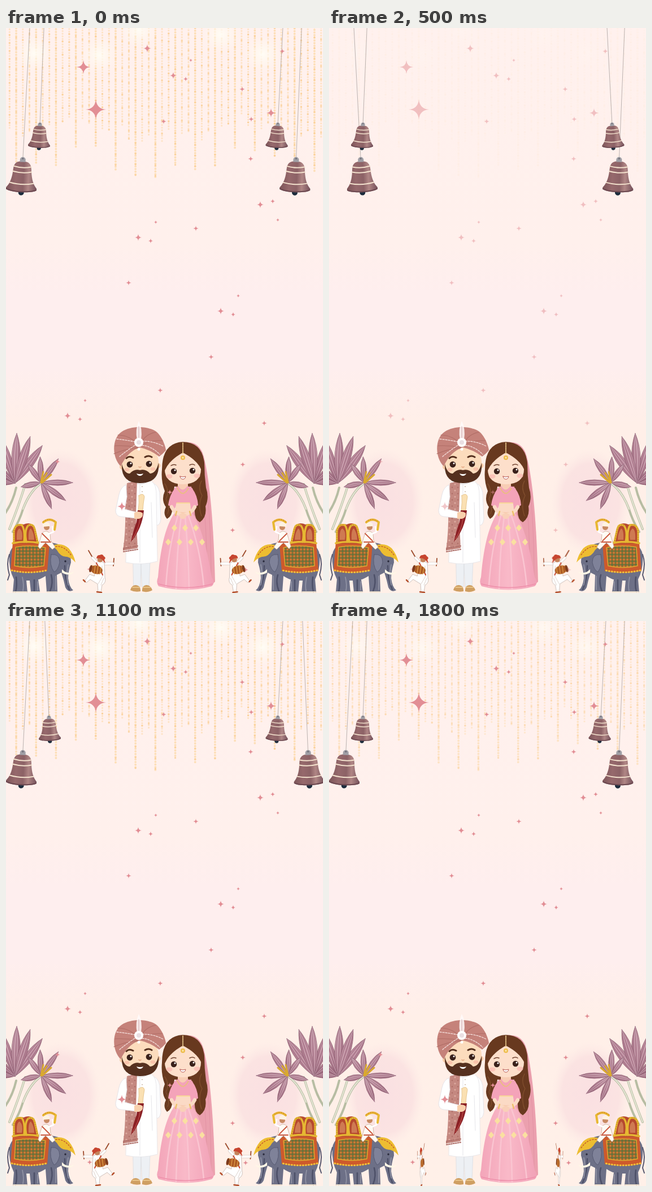
Write an HTML page that moves like this. It is 561 px wide and 998 px high and loops after 1900 ms.

```html
<!DOCTYPE html>
<html lang="en">
<head>
<meta charset="utf-8">
<title>Wedding invitation</title>
<style>
html, body { margin: 0; width: 100%; height: 100%; overflow: hidden; background: #fff0ea; }
svg { display: block; width: 561px; height: 998px; }
</style>
</head>
<body>
<svg viewBox="0 0 561 998" fill="none" stroke-linecap="round" stroke-linejoin="round">
<defs>
  <linearGradient id="sky" x2="0" y2="1">
    <stop offset="0" stop-color="#fff1ee"/><stop offset=".38" stop-color="#fff0ec"/>
    <stop offset=".47" stop-color="#feeeee"/><stop offset=".6" stop-color="#feeeee"/>
    <stop offset=".7" stop-color="#ffefe8"/><stop offset="1" stop-color="#fff0e8"/>
  </linearGradient>
  <radialGradient id="glow"><stop stop-color="#fffdf5" stop-opacity=".95"/><stop offset=".5" stop-color="#fffaf0" stop-opacity=".5"/><stop offset="1" stop-color="#fff8ee" stop-opacity="0"/></radialGradient>
  <radialGradient id="wash"><stop stop-color="#fae0e2"/><stop offset=".72" stop-color="#fbe3e2"/><stop offset="1" stop-color="#fdeae6" stop-opacity="0"/></radialGradient>
  <linearGradient id="metal"><stop stop-color="#7d5559"/><stop offset=".3" stop-color="#96696c"/><stop offset=".55" stop-color="#8c6266"/><stop offset=".72" stop-color="#b08685"/><stop offset="1" stop-color="#74505a"/></linearGradient>
  <linearGradient id="skirt"><stop stop-color="#f3a5b9"/><stop offset=".5" stop-color="#f9b9c8"/><stop offset="1" stop-color="#f1a2b7"/></linearGradient>
  <linearGradient id="petal" x2="1" y2="1"><stop stop-color="#d0a9b5"/><stop offset=".5" stop-color="#b98799"/><stop offset="1" stop-color="#9b667b"/></linearGradient>
  <pattern id="dots" width="10" height="11" patternUnits="userSpaceOnUse"><circle cx="3" cy="3" r="1.6" fill="#dcaaa0"/><circle cx="8" cy="8.500" r="1.200" fill="#ad6d65"/></pattern>
  <pattern id="weave" width="6" height="6" patternUnits="userSpaceOnUse"><path d="M0 0h6v6h-6z" fill="#68753a"/><path d="M0 3L3 0L6 3L3 6Z" fill="#b9672f"/><circle cx="3" cy="3" r=".8" fill="#e6b843"/></pattern>
  <g id="bell">
    <circle cx="0" cy="63" r="5" fill="#1c2c3d"/>
    <path d="M-5 8C-12 9-15 13-16 21C-17 37-20 47-27 55V58C-20 64 20 64 27 58V55C20 47 17 37 16 21C15 13 12 9 5 8Z" fill="url(#metal)"/>
    <path d="M-27 56C-18 62 18 62 27 56V58C20 64-20 64-27 58Z" fill="#6b4850"/>
    <path d="M-15.500 17Q0 21 15.500 17M-16.500 26Q0 30 16.500 26M-21 46Q0 51 21 46" stroke="#f3e1cd" stroke-width="2"/>
    <path d="M-5 9V5Q-5 1 0 0Q5 1 5 5V9Z" fill="#a09fa6"/><circle cx="0" cy="3" r="1.500" fill="#6d6c75"/>
  </g>
  <g id="drummer">
    <path d="M146 923L153 935M191 937L190 950" stroke="#9c4a2b" stroke-width="1.800"/>
    <path d="M162 945L153 936M171 946L189 946" stroke="#cfc3bd" stroke-width="5"/>
    <path d="M162 945L153 936M171 946L189 946" stroke="#fff" stroke-width="3.800"/>
    <path d="M160 944Q167 940 174 945L175 970Q178 980 170 984L168 996H163L162 982L149 974L142 980L139 977L148 965L156 968Z" fill="#fff" stroke="#c9bcb6" stroke-width=".9"/>
    <path d="M170 950L171 968L163 982M173 972L168 984" stroke="#d8ccc6" stroke-width=".9"/>
    <path d="M161 996L169 997M140 978L137 975" stroke="#b5522f" stroke-width="2.500"/>
    <path d="M160 945L171 966" stroke="#c9482f" stroke-width="2"/>
    <ellipse cx="160" cy="957" rx="11" ry="7.500" transform="rotate(14 160 957)" fill="#ad5b24"/>
    <path d="M153 949L151 960M158 949L156 963M163 950L161 964M168 953L166 965" stroke="#e6a950" stroke-width="1.100"/>
    <ellipse cx="150" cy="955" rx="2.500" ry="6.500" transform="rotate(14 150 955)" fill="#7d3a1c"/>
    <circle cx="166.500" cy="939" r="4.800" fill="#c5825a"/>
    <path d="M160 937Q161 930 166 931Q171 928 173 933Q178 936 174 939L176 946L171 940Q166 935 160 937Z" fill="#c7452f"/>
  </g>
  <g id="side">
    <ellipse cx="98" cy="837" rx="70" ry="94" fill="url(#wash)"/>
    <path d="M34 806Q24 840 6 885M18 812Q12 838-2 858M62 804Q42 818 30 850Q24 870 12 890" stroke="#b7bda3" stroke-width="4"/>
    <path d="M34 806Q24 840 6 885M62 804Q42 818 30 850" stroke="#e8e9d8" stroke-width="2"/>
    <g id="petals"></g>
    <path d="M62 803L72 786M64 803L80 789M62 802L66 784" stroke="#d9a92f" stroke-width="3"/>
    <path d="M6 930Q10 906 46 908Q88 906 100 916Q115 924 115 944Q110 960 110 972Q112 988 119 993Q110 998 105 988Q102 974 98 962L90 966L91 996H72L70 968Q60 974 57 974L60 996H44L42 976H36L38 997H12L14 974Q4 954 6 930Z" fill="#6d7087"/>
    <path d="M18 970Q20 985 17 996M50 975V995M80 966Q84 980 78 995M104 950Q104 975 112 992" stroke="#4d5068" stroke-width="2.500"/>
    <path d="M29 970Q32 984 30 994M56 978V993M88 968V992M110 948Q106 970 110 984" stroke="#9597a8" stroke-width="1.500"/>
    <path d="M6 930Q0 946 6 966L3 975" stroke="#565970" stroke-width="2"/>
    <path d="M80 930Q95 928 95 944Q92 958 85 961Q76 948 80 930Z" fill="#7f8299" stroke="#585b73"/>
    <path d="M99 956Q108 966 121 960Q113 970 99 962Z" fill="#fff7e6"/>
    <path d="M82 914Q99 908 111 919Q120 930 123 944Q116 936 108 934Q97 935 90 922Z" fill="#edbd31"/>
    <path d="M88 916Q103 914 115 931" stroke="#c95b2b" stroke-width="1.500" stroke-dasharray="2 3"/>
    <circle cx="105" cy="942" r="1.700" fill="#28293a"/>
    <path d="M13 996H37M45 996H59M73 996H90" stroke="#e8dccb" stroke-width="2"/>
    <path d="M12 909Q44 904 77 912L73 959Q40 966 8 959Z" fill="#cd5a2c"/>
    <path d="M17 917Q44 912 70 918L67 950Q40 956 15 950Z" fill="url(#weave)" stroke="#dca832" stroke-width="1.500"/>
    <path d="M10 958Q40 965 72 958" stroke="#f0c23a" stroke-width="3" stroke-dasharray="1 4"/>
    <path d="M13 911L14 884Q20 873 31 877Q41 872 50 879L57 911Z" fill="#b6492f"/>
    <path d="M19 904Q18 886 24 884Q31 890 28 904M40 904Q39 886 44 884Q50 892 50 904" fill="#cf7a52"/>
    <path d="M14 908V888Q17 875 28 878Q34 886 32 908M36 908Q32 888 39 879Q48 874 51 886L56 908M12 910Q34 905 62 910" stroke="#e6b832" stroke-width="3.500"/>
    <path d="M14 908V888Q17 875 28 878M39 879Q48 874 51 886L56 908" stroke="#a96a22" stroke-dasharray="1 3"/>
    <path d="M64 892Q71 885 78 893L79 905L87 917L82 921L70 909L60 920L57 916Z" fill="#fffaf3" stroke="#d0b3a2" stroke-width=".9"/>
    <path d="M64 893L77 906M62 908H79" stroke="#c9583f" stroke-width="1.800"/>
    <path d="M75 894L84 890L82 881" stroke="#fff" stroke-width="3"/>
    <circle cx="72" cy="882" r="5" fill="#c88a62"/>
    <path d="M65 881Q64 872 72 873Q79 874 77 880Z" fill="#fff3e2"/>
    <path d="M66 873Q77 864 88 873L86 886" stroke="#e8b832" stroke-width="4"/>
    <path d="M66 872Q77 864 88 873" stroke="#c95b2b" stroke-dasharray="1 3"/>
  </g>
</defs>

<path d="M0 0H561V998H0Z" fill="url(#sky)"/>
<g id="curtain"></g>
<g id="glows"></g>
<g id="bells"></g>
<use href="#side"/>
<use href="#side" transform="matrix(-1 0 0 1 561 0)"/>

<g id="groom">
  <path d="M225 940H239L238 987H226ZM239 940H255L253 987H241Z" fill="#edf0f4" stroke="#d9dde4" stroke-width=".8"/>
  <path d="M220 993Q222 984 230 984Q239 985 238 995Q228 997 220 993ZM241 995Q240 985 248 984Q256 984 259 993Q250 998 241 995Z" fill="#cf9f62"/>
  <path d="M224 988H236M243 988H255" stroke="#f0cf94" stroke-width="1.500"/>
  <path d="M255 803Q269 804 272 820L274 868Q272 880 266 878L258 860Z" fill="#fcfcfd" stroke="#dfdfe4" stroke-width=".8"/>
  <path d="M218 800H256Q267 804 266 830L268 942Q240 950 212 944L214 815Z" fill="#fff" stroke="#e4e2e6" stroke-width=".8"/>
  <path d="M237 804V944M257 838L259 900" stroke="#e3e2e7" stroke-width=".9"/>
  <path d="M241 810V860" stroke="#c9b6a6" stroke-width="2" stroke-dasharray="0 9"/>
  <path d="M226 797H248V803Q237 809 226 803Z" fill="#fff" stroke="#dcdbe0"/>
  <path d="M214 804L232 799L230 860L233 919L207 923Q212 890 211 850Z" fill="#c48880"/>
  <path d="M214 804L232 799L230 860L233 919L207 923Q212 890 211 850Z" fill="url(#dots)"/>
  <path d="M208 919L233 915M208 925L233 921" stroke="#ad6d67" stroke-width="2" stroke-dasharray="2 2"/>
  <path d="M235 826Q243 820 245 828Q243 838 242 852H234Q236 838 235 826Z" fill="#fae0b2" stroke="#e3bd80" stroke-width=".8"/>
  <path d="M233 852H244Q241 884 221 908Q225 888 231 873Z" fill="#8b2025"/>
  <path d="M237 867Q235 885 224 902" stroke="#b94a46" stroke-width="1.300"/>
  <path d="M212 807Q203 811 200 824L194 852Q194 862 203 863L230 866V855L210 850L214 828Z" fill="#fff" stroke="#dfdee4" stroke-width=".8"/>
  <path d="M227 856Q236 852 242 857Q243 865 235 867H227Z" fill="#f8d0ac"/>
  <circle cx="206" cy="775" r="5" fill="#f7cda9"/><circle cx="269" cy="773" r="4.500" fill="#f7cda9"/>
  <path d="M205 765Q207 741 237 740Q268 741 270 765Q272 801 237 802Q203 801 205 765Z" fill="#fcdcbd"/>
  <path d="M205 770Q209 787 219 787Q227 778 237 781Q247 778 255 787Q266 786 270 768Q273 804 237 804Q203 804 205 770Z" fill="#55301f"/>
  <path d="M231 787Q237 789 243 787Q241 791 237 791Q233 791 231 787Z" fill="#fff"/>
  <ellipse cx="214" cy="780" rx="4.500" ry="3" fill="#f8b8a4" opacity=".7"/><ellipse cx="260" cy="779" rx="4.500" ry="3" fill="#f8b8a4" opacity=".7"/>
  <path d="M213 760Q218 755 225 759M246 758Q252 754 258 758" stroke="#55301f" stroke-width="3"/>
  <path d="M235 775Q237 777 239 775" stroke="#e2a680" stroke-width="1.500"/>
  <circle cx="219" cy="771" r="5.400" fill="#3a211b"/><circle cx="253" cy="770" r="5.400" fill="#3a211b"/>
  <circle cx="221" cy="769" r="1.500" fill="#fff"/><circle cx="255" cy="768" r="1.500" fill="#fff"/>
  <path d="M203 774C187 759 187 724 205 713C222 702 252 703 266 713C277 722 283 741 283 746Q277 753 271 757Q254 744 237 741Q216 747 203 774Z" fill="#c5827a"/>
  <path d="M193 738Q213 737 234 741M191 752Q212 743 234 742M198 719Q218 719 235 736M265 714Q247 717 238 734M277 729Q257 727 238 738" stroke="#b06d66" stroke-width="1.100"/>
  <path d="M196 726Q214 728 229 731M241 730Q260 729 279 739M201 757Q214 746 230 736M241 737Q258 739 272 753" stroke="#f5dfdc" stroke-width="1.300" stroke-dasharray="3 2"/>
  <path d="M235 694Q228 710 232 727H239Q242 708 235 694Z" fill="#fffafa" opacity=".85"/>
  <path d="M235 704V726" stroke="#cfaeb3"/>
  <circle cx="235" cy="732" r="8" fill="#fff"/><circle cx="235" cy="732" r="4" fill="#eadfe3"/><circle cx="235" cy="744" r="2.500" fill="#fff"/>
</g>

<g id="bride">
  <path d="M300 735Q341 722 350 757Q366 820 370 978Q360 990 335 985L300 900Z" fill="#eba0ae"/>
  <path d="M350 765Q363 850 363 980M346 800Q356 880 356 980" stroke="#e393a4"/>
  <path d="M313 731Q347 732 351 768Q351 790 354 812Q360 830 353 845Q356 864 343 873Q333 868 334 850L328 810H298L294 842Q296 862 285 867Q277 858 283 846Q274 834 281 818Q274 800 276 780Q276 733 313 731Z" fill="#68391f"/>
  <path d="M346 800Q339 812 347 826Q339 842 346 862M281 805Q290 818 283 832Q291 845 286 858" stroke="#83502f" stroke-width="1.200"/>
  <path d="M304 800H322V814L313 822L304 814Z" fill="#f8cdb4"/>
  <path d="M301 835H326L328 862H299Z" fill="#fbdac5"/>
  <path d="M298 813L305 809Q312 822 321 809L330 813Q333 826 328 840H300Q295 826 298 813Z" fill="#f4a3b9"/>
  <path d="M303 812Q313 832 323 812" stroke="#e9c179" stroke-width="2" stroke-dasharray="1 2"/>
  <path d="M300 839H328" stroke="#f8d798" stroke-width="2"/>
  <path d="M301 853Q313 858 327 853Q350 883 364 970Q371 980 364 986Q318 999 270 986Q265 980 269 970Q276 884 301 853Z" fill="url(#skirt)"/>
  <path d="M304 862Q287 920 283 986M310 862Q302 930 301 990M317 862Q323 930 324 990M323 862Q344 920 350 986" stroke="#fac5d1" stroke-width="2.500"/>
  <path d="M270 982Q318 995 365 982" stroke="#ee8faa" stroke-width="1.500"/>
  <path id="gems" fill="#fae0a0"/>
  <path d="M301 855Q313 860 327 855" stroke="#f3cf86" stroke-width="3"/>
  <path d="M298 814Q289 826 287 843L299 849L304 828ZM330 814Q339 826 340 843L328 849L323 828Z" fill="#f4a3b9"/>
  <path d="M293 846Q298 857 312 860M334 846Q329 857 314 860" stroke="#fbdac5" stroke-width="6.500"/>
  <path d="M302 854L300 861M325 854L327 861" stroke="#edc06a" stroke-width="2.500"/>
  <path d="M306 860Q313 853 320 860Q318 868 313 867Q308 868 306 860Z" fill="#f9d0b8"/>
  <path d="M281 776Q287 754 313 750Q340 754 345 776Q347 805 313 806Q279 805 281 776Z" fill="#fddfcb"/>
  <path d="M279 788Q275 736 313 736Q351 736 348 788Q344 766 313 750Q284 766 279 788Z" fill="#68391f"/>
  <path d="M313 733V754" stroke="#f0d193" stroke-width="1.800" stroke-dasharray="1 2"/>
  <circle cx="313" cy="759" r="4" fill="#eebd4d"/><circle cx="313" cy="759" r="1.700" fill="#fbe8a8"/>
  <ellipse cx="289" cy="792" rx="5.500" ry="3.800" fill="#f9b9b2" opacity=".75"/><ellipse cx="338" cy="791" rx="5.500" ry="3.800" fill="#f9b9b2" opacity=".75"/>
  <path d="M292 773Q296 770 301 772M325 772Q330 769 334 772" stroke="#6c3f2b" stroke-width="1.500"/>
  <circle cx="297" cy="783" r="5.200" fill="#3a211b"/><circle cx="330" cy="782" r="5.200" fill="#3a211b"/>
  <circle cx="299" cy="781" r="1.500" fill="#fff"/><circle cx="332" cy="780" r="1.500" fill="#fff"/>
  <path d="M308 792Q313 794 318 792Q317 797 313 797Q309 797 308 792Z" fill="#fff" stroke="#b85a55"/>
</g>

<g id="stars" fill="#e28e95"></g>
<g id="left"><use href="#drummer"/></g>
<g id="right"><use href="#drummer"/></g>
</svg>

<script>
const $ = id => document.getElementById(id);
const add = (parent, tag, attrs) => {
  const el = document.createElementNS('http://www.w3.org/2000/svg', tag);
  for (const k in attrs) el.setAttribute(k, attrs[k]);
  return parent.appendChild(el);
};
const clamp = (v, low = 0) => Math.max(low, Math.min(1, v));
let seed = 11;
const random = () => (seed = seed * 16807 % 2147483647) / 2147483647;

// Bead strings, shorter towards the middle; every third one hangs low
for (let i = 0; i < 48; i++) {
  const x = 6.3 + 11.73 * i, low = i % 3 === 1;
  const edge = Math.abs(Math.cos(Math.PI * i / 23.5));
  const length = (low ? 205 : 142) + 35 * edge + 30 * random();
  const beads = (width, gap, stroke, opacity) => add($('curtain'), 'path', {
    d: `M${x} ${-5 * random()}V${length}`, stroke, opacity, 'stroke-width': width, 'stroke-dasharray': `0 ${gap}` });
  beads(low ? 3.9 : 3.3, 4.7, '#fddcb0', low ? .85 : .65);
  beads(3.4, 14.1 + 4.7 * (i % 3), '#f9cb8c', .7);
}

for (const [cx, cy] of [[50, 45], [165, 48], [235, 3], [380, 12], [454, 46]])
  add($('glows'), 'circle', { cx, cy, r: 32, fill: 'url(#glow)' });

// A striped petal from its base to a tip at the given angle
function petal(x, y, degrees, length, width) {
  const a = degrees * Math.PI / 180, cos = Math.cos(a), sin = Math.sin(a);
  const tip = `${x + cos * length} ${y + sin * length}`;
  const bend = s => `Q${x + cos * length * .55 - sin * width * s} ${y + sin * length * .55 + cos * width * s} `;
  add($('petals'), 'path', {
    d: `M${x} ${y}${bend(1)}${tip} ${bend(-1)}${x} ${y}Z`, fill: 'url(#petal)', stroke: '#895b6e', 'stroke-width': .8 });
  for (let i = -2; i <= 2; i++) add($('petals'), 'path', {
    d: `M${x} ${y}${bend(i * .32)}${tip}`, stroke: i % 2 ? '#e6cdd4' : '#915f75', 'stroke-width': .8, opacity: .7 });
}
for (const a of [-172, -140, -54, -108, -88, -72]) petal(16, 804, a, 56 + 32 * Math.sin(-a * Math.PI / 180), 15);
for (const a of [168, -125, -92, 68, 36, 0, -54]) petal(62, 803, a, 46 + 10 * Math.cos(a * Math.PI / 180), 10);

let gems = '';
for (const [y, count, gap] of [[883, 3, 19], [908, 4, 20]])
  for (let i = 0; i < count; i++) gems += `M${317 + (i - (count - 1) / 2) * gap} ${y - 6}l5 6l-5 6l-5-6Z`;
$('gems').setAttribute('d', gems);

const star = (x, y, r) => add($('stars'), 'path', {
  d: 'M0-1Q.07-.07 1 0Q.07.07 0 1Q-.07.07-1 0Q-.07-.07 0-1Z',
  transform: `translate(${x} ${y}) scale(${r})` });
// The same trio repeats, once upside down
for (const [x, y, flip] of [[296, 84, 1], [234, 370, 1], [380, 500, 1], [109, 685, 1], [450, 312, -1]]) {
  star(x, y, 6);
  star(x + 22, y + 6 * flip, 4.3);
  star(x + 31, y - 27 * flip, 3.3);
}
for (const [x, y, r = 4.8] of [[159, 144, 18], [137, 69, 12], [469, 150, 8], [205, 845, 8], [250, 36, 7],
  [489, 41], [418, 108], [434, 161], [279, 165], [433, 231], [336, 354], [217, 450], [363, 581], [273, 640],
  [457, 698], [91, 766], [419, 771], [290, 820], [401, 887], [148, 956], [424, 957]]) star(x, y, r);

// Bells: hanging point, string length, size, swing in degrees, rhythm
const early = s => clamp(Math.min(s / 5, 2 - s / 5));
const late = s => clamp(Math.min((s - 5) / 4.5, (15.5 - s) / 4.5));
const bells = [[43, 228, 1, 3, early], [68, 167, .72, 2.4, late],
               [524, 228, 1, 2.4, late], [491, 167, .72, 3, early]].map(([x, y, size, angle, rhythm]) => {
  const el = add($('bells'), 'g', {});
  add(el, 'path', { d: `M0-30V${y + 2}`, stroke: '#aaa3a1', 'stroke-width': .8 });
  add(el, 'use', { href: '#bell', transform: `translate(0 ${y}) scale(${size})` });
  return { el, x, angle, rhythm };
});

const STEP = 100, STEPS = 19, BEAT = 11;
const turns = [1, 3.5, 6, 12, 15, 18];

function draw(step) {
  const beat = step % BEAT;
  const shine = beat < 5 ? .1 + .9 * (1 - beat / 5) ** 2 : clamp(.1 + .325 * (beat - 5));
  $('curtain').setAttribute('opacity', shine);
  $('glows').setAttribute('opacity', .15 + .85 * shine ** 2);
  $('stars').setAttribute('opacity', 1 - .5 * clamp(1 - Math.abs(beat - 5) / 2));
  for (const { el, x, angle, rhythm } of bells) {
    const a = angle * (1 - 2 * rhythm(step));
    el.setAttribute('transform', `translate(${x} 0) rotate(${a} 0 -20)`);
  }
  // Each turn passes through a thin side view
  const k = turns.reduce((w, t) => w * (clamp(2 * (t - step), -1) || .28), 1);
  $('left').setAttribute('transform', `matrix(${k} 0 0 1 ${164 * (1 - k)} 0)`);
  $('right').setAttribute('transform', `matrix(${-k} 0 0 1 ${406.5 + 164 * k} 0)`);
}

const start = performance.now();
function tick() {
  draw(Math.floor((performance.now() - start) / STEP) % STEPS);
  requestAnimationFrame(tick);
}
tick();
</script>
</body>
</html>
```
